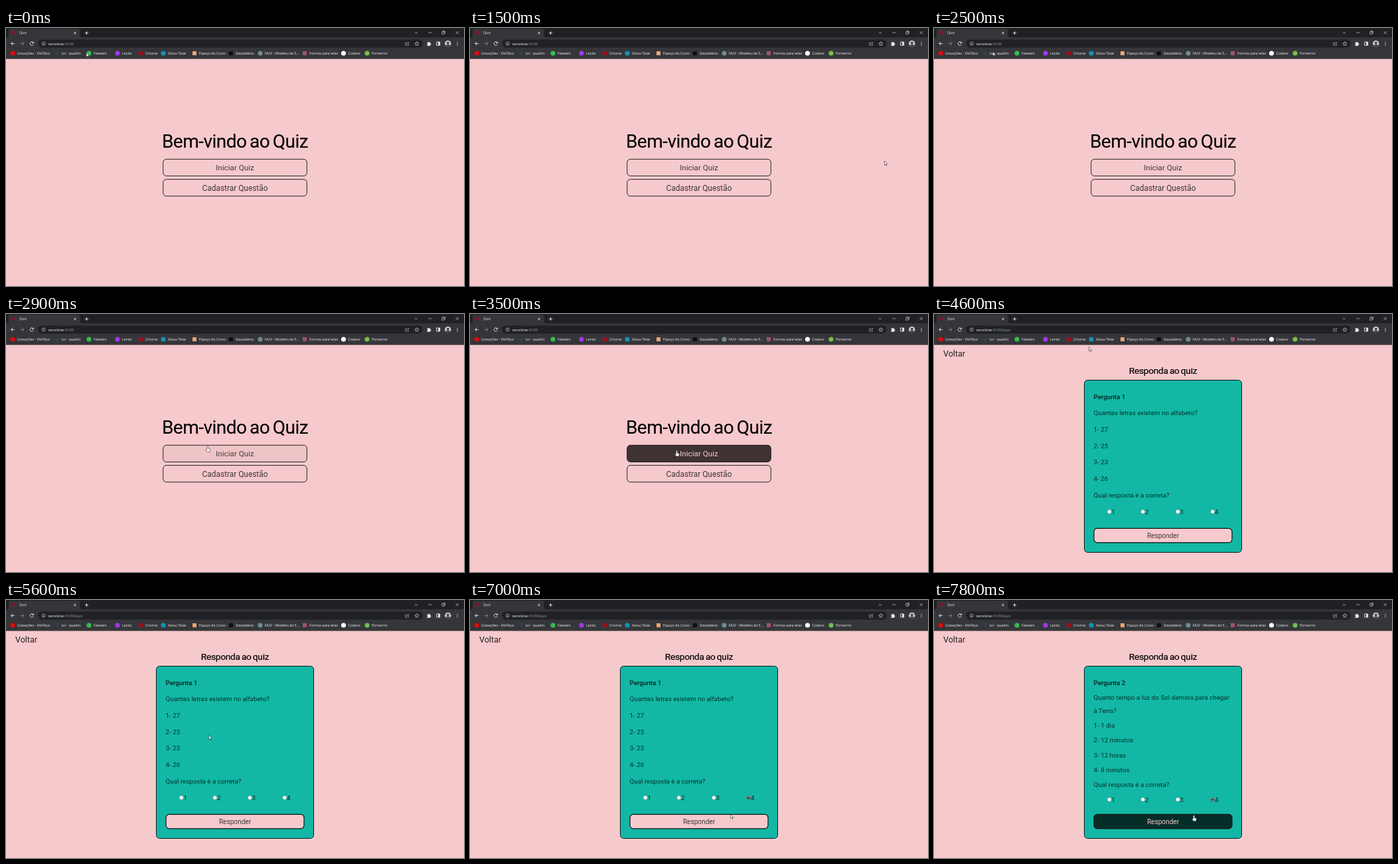
Recreate the animation shown at these times as an HTML page. Size 690x388 px, loop 8 s.

```html
<!DOCTYPE html>
<html lang="pt-BR">
<head>
<meta charset="utf-8">
<title>Quiz</title>
<style>
  html, body { margin: 0; width: 100%; height: 100%; overflow: hidden; background: #f6c9cc; }
  svg { display: block; width: 690px; height: 388px; cursor: default; }
  text { white-space: pre; }
  .ui { font: 500 5.2px "Open Sans", "Noto Sans", sans-serif; fill: #f4f5f6; }
  .url { font-size: 5.9px; }
  .dim { fill: #9aa0a6; }
  .page { font-family: Roboto, Inter, sans-serif; font-weight: 400; fill: #222; }
  .title { fill: #000; stroke: #000; letter-spacing: -.018em; word-spacing: -.07em; }
  .card { font-size: 9.8px; fill: #06302b; }
  .strong { font-weight: 500; fill: #04211e; }
  .line { fill: none; stroke: #e8eaed; stroke-width: .9; }
</style>
</head>
<body>
<svg id="stage" viewBox="0 0 690 388" xmlns="http://www.w3.org/2000/svg"></svg>
<script>
const LOOP = 8000, STEP = 100;
const PINK = [246, 201, 204, 1], SHADE = [0, 0, 0, .75], CLEAR = [0, 0, 0, 0], INK = [62, 56, 57, 1];

const stage = document.getElementById('stage');

function el(parent, tag, attrs, content) {
  const node = document.createElementNS('http://www.w3.org/2000/svg', tag);
  for (const key in attrs) node.setAttribute(key, attrs[key]);
  if (content !== undefined) node.textContent = content;
  return parent.appendChild(node);
}
const group = (parent, cls = '') => el(parent, 'g', { class: cls });
const rect = (p, x, y, width, height, attrs) => el(p, 'rect', { x, y, width, height, ...attrs });
const disc = (p, cx, cy, r, fill, attrs) => el(p, 'circle', { cx, cy, r, fill, ...attrs });
const label = (p, x, y, str, attrs) => el(p, 'text', { x, y, ...attrs }, str);
const path = (p, d, attrs) => el(p, 'path', { d, class: 'line', ...attrs });
const show = (node, on) => node.setAttribute('display', on ? 'inline' : 'none');

// Browser frame
function drawBrowser() {
  const g = group(stage, 'ui');
  rect(g, 0, 0, 690, 15, { fill: '#202124' });
  rect(g, 0, 14, 690, 32.5, { fill: '#35363a' });
  path(g, 'M1 14.2Q4 14.2 4 11V4Q4 1 7 1H108.500Q111.500 1 111.500 4V11Q111.500 14.200 114.500 14.200Z',
    { style: 'fill:#35363a;stroke:none' });
  rect(g, 9.5, 4.5, 5, 5, { fill: '#7d1533' });
  label(g, 20, 9.3, 'Quiz');
  path(g, 'M102.300 5.800l3.400 3.400m0-3.400l-3.400 3.400M121.500 4.800v5.400m-2.700-2.700h5.400');
  path(g, 'M615.800 6l2.200 2.200L620.200 6M636.500 7h5M656.800 5.800h3.400v3.400h-3.400zM658 5.600v-1h3.500v3.400h-1M677.500 4.800l4.400 4.400m0-4.400l-4.400 4.400',
    { style: 'stroke-width:.6' });

  path(g, 'M13 23.500H7.600m2.500-2.600l-2.600 2.600 2.600 2.600');
  path(g, 'M21.500 23.500h5.400m-2.500-2.600l2.600 2.600-2.600 2.600', { style: 'stroke:#85878b' });
  path(g, 'M41 22a2.600 2.600 0 1 0 .3 2.300M41.500 20.500v2h-2');
  rect(g, 48, 17.5, 580, 12, { rx: 6, fill: '#202124' });
  path(g, 'M54.200 23.500a2.500 2.500 0 1 0 5 0a2.500 2.500 0 1 0-5 0M56.700 23v2M56.700 21.700v.6', { style: 'stroke-width:.6' });
  const url = label(g, 63.5, 25.5, '', { class: 'url' });
  el(url, 'tspan', {}, 'servilote');
  const rest = el(url, 'tspan', { class: 'dim' });

  path(g, 'M603.500 22h-1.800v4h5v-1.500M603.500 24.500q.3-2.300 3.200-2.300m-1.300-1.500l1.600 1.500-1.600 1.500', { style: 'stroke-width:.5' });
  path(g, 'M619 20.500l.9 2 2.200.2-1.700 1.500.5 2.200-1.900-1.200-1.900 1.200.5-2.200-1.700-1.500 2.200-.2z', { style: 'stroke-width:.6' });
  path(g, 'M634.500 21.800h1.400a1 1 0 0 1 2 0h1.500v1.500a1 1 0 0 1 0 2v1.400h-4.900v-1.500a1 1 0 0 0 0-1.900z', { style: 'fill:#e8eaed;stroke:none' });
  path(g, 'M648.700 21h5v5h-5z');
  rect(g, 651.2, 21, 2.5, 5, { fill: '#e8eaed' });
  disc(g, 665.8, 23.5, 4.7, '#cfcac6');
  path(g, 'M662.300 26.500q.5-2 3.500-2t3.500 2q-3.500 3.300-7 0z', { style: 'fill:#4b4240;stroke:none' });
  disc(g, 665.8, 22.4, 1.9, '#4b4240');
  for (const y of [21.3, 23.5, 25.7]) disc(g, 680, y, .65, '#e8eaed');

  // icon centre, colour, round, name
  const marks = [
    [10, '#f00', 0, 'Gravações - ViloTeca'], [77, '#29404a', 0, 'lur - quadro'],
    [125, '#2fc24d', 1, 'Falavelo'], [168, '#a435f0', 1, 'Lecda'],
    [203, '#a30d14', 0, 'Cinorva'], [237, '#1a8fb5', 1, 'Sarau Telas'],
    [284, '#eda66c', 0, 'Espaço do Curso'], [339, '#0d0d10', 0, 'Zarpadevia'],
    [383, '#6f8b8e', 1, 'NUV - Modelos de E...'], [450, '#a8506e', 0, 'Formas para telas'],
    [508.5, '#fff', 1, 'Codavo'], [544, '#74c04a', 1, 'Pomarino']
  ];
  for (const [x, fill, round, name] of marks) {
    if (round) disc(g, x, 38, 3.6, fill);
    else rect(g, x - 3, 35, 6, 6, { fill });
    label(g, x + 7, 40, name);
  }
  return rest;
}

function drawButton(p, x, y, w, h, str, size, base, line) {
  const box = rect(p, x, y, w, h, { rx: 5, stroke: '#111', 'stroke-width': line, fill: 'none' });
  const text = label(p, 345, base, str, { 'text-anchor': 'middle', 'font-size': size, fill: mix(INK, PINK, 0) });
  return { box, text };
}

function mix(a, b, k) {
  return `rgba(${a.map((v, i) => +(v + (b[i] - v) * k).toFixed(3)).join()})`;
}

function tint(button, from, k) {
  button.box.setAttribute('fill', mix(from, SHADE, k));
  button.text.setAttribute('fill', mix(INK, PINK, k));
}

function drawHome() {
  const g = group(stage, 'page');
  label(g, 345, 180, 'Bem-vindo ao Quiz', { class: 'title', 'text-anchor': 'middle', 'font-size': 28, 'stroke-width': .1 });
  const start = drawButton(g, 236.7, 197.3, 216.6, 25.2, 'Iniciar Quiz', 11.7, 214, .9);
  drawButton(g, 236.7, 227.6, 216.6, 25.2, 'Cadastrar Questão', 11.9, 244.5, .9);
  return { g, start };
}

function drawQuiz() {
  const g = group(stage, 'page');
  label(g, 14, 64, 'Voltar', { 'font-size': 12.5 });
  label(g, 345, 90.2, 'Responda ao quiz', { class: 'title', 'text-anchor': 'middle', 'font-size': 13.7, 'stroke-width': .2 });
  rect(g, 226.5, 99.5, 237, 259, { rx: 5, fill: '#12b8a5', stroke: '#0c1a19' });
  const send = drawButton(g, 241, 322.4, 208, 21.4, 'Responder', 10.1, 336.8, 1.2);
  return { g, send };
}

function drawQuestion(parent, number, lines, gap, radioY) {
  const g = group(parent, 'card');
  label(g, 240.5, 127.6, 'Pergunta ' + number, { class: 'strong' });
  const wrapped = lines.length > 5;
  [...lines, 'Qual resposta é a correta?'].forEach((str, i) => {
    const y = wrapped ? 149.8 + i * gap - (i ? 1.7 : 0) : 152.3 + i * gap;
    label(g, 240.5, y, str);
  });
  [264.2, 314.8, 367.4, 419.8].forEach((x, i) => {
    disc(g, x, radioY, 3, '#fff', { stroke: '#767676', 'stroke-width': .5 });
    label(g, x + 3.1, radioY + 3.5, i + 1);
  });
  const dot = group(g);
  disc(dot, 419.8, radioY, 2.7, '#fff', { stroke: '#111', 'stroke-width': .8 });
  disc(dot, 419.8, radioY, 1.6, '#111');
  return { g, dot };
}

const rest = drawBrowser();
const home = drawHome();
const quiz = drawQuiz();
const questions = [
  drawQuestion(quiz.g, 1, ['Quais os países que têm a maior e a menor', 'expectativa de vida do mundo?',
    '1- Austrália e Afeganistão', '2- Itália e Chade', '3- Japão e Serra Leoa', '4- Estados Unidos e Angola'], 22.1, 300),
  drawQuestion(quiz.g, 1, ['Quantas letras existem no alfabeto?', '1- 27', '2- 25', '3- 23', '4- 26'], 24.7, 297.3),
  drawQuestion(quiz.g, 2, ['Quanto tempo a luz do Sol demora para chegar', 'à Terra?',
    '1- 1 dia', '2- 12 minutos', '3- 12 horas', '4- 8 minutos'], 22.1, 300)
];

const pointer = group(stage);
const skin = { fill: '#fff', stroke: '#222', 'stroke-width': .55, class: '' };
const arrow = path(pointer, 'M0 0V6.300L1.500 5 2.500 7.300 3.400 6.900 2.500 4.700H4.400Z', skin);
const hand = path(pointer, 'M-1 .8a1 1 0 0 1 2 0V3.400l2 .5q1 .3.9 1.300L3.300 8.600H-.7L-2.700 5.700q-.4-1 .6-1L-1 5.400Z', skin);

// Pointer: time, x, y
const track = [
  [0, 121, 37], [100, 126, 35], [400, 340, 104], [900, 606, 222], [1000, 606, 222],
  [1200, 640, 249], [1350, 653, 225], [1500, 624.5, 200], [1650, 596, 190], [1800, 558, 244],
  [1900, 558, 244], [2350, 76, 26], [2450, 76, 26], [2800, 303.7, 199], [2900, 303.7, 199],
  [3200, 303, 204.5], [3300, 303, 204.5], [3500, 311.5, 205.5], [3800, 311.5, 205.5],
  [4100, 37, 21.5], [4200, 37, 21.5], [4500, 212, 37], [5400, 311, 165], [5600, 305.5, 203.5],
  [6300, 419, 295], [6600, 419, 295], [7000, 392.5, 322], [7200, 391.5, 324], [8000, 391.5, 324]
];

// Smooth slope through a point, flat at turns and rests
function slope(i, axis) {
  const a = track[i - 1], b = track[i], c = track[i + 1];
  if (!a || !c || (b[axis] - a[axis]) * (c[axis] - b[axis]) <= 0) return 0;
  return (c[axis] - a[axis]) / (c[0] - a[0]);
}

function along(t, axis) {
  const i = track.findIndex((p, n) => n && t <= p[0]);
  const a = track[i - 1], b = track[i], span = b[0] - a[0], u = (t - a[0]) / span, v = 1 - u;
  return v * v * (1 + 2 * u) * a[axis] + u * u * (3 - 2 * u) * b[axis]
    + span * u * v * (v * slope(i - 1, axis) - u * slope(i, axis));
}

function ease(t, from, to) {
  const u = Math.min(1, Math.max(0, (t - from) / (to - from)));
  return u * u * (3 - 2 * u);
}

function render(t) {
  const inQuiz = t >= 3700;
  const current = t < 4300 ? 0 : t < 7400 ? 1 : 2;
  show(home.g, !inQuiz);
  show(quiz.g, inQuiz);
  rest.textContent = ':4100' + (inQuiz ? '/quiz' : '');
  questions.forEach(({ g, dot }, i) => {
    show(g, i === current);
    show(dot, t >= 6500);
  });
  tint(home.start, CLEAR, ease(t, 2860, 3200));
  tint(quiz.send, PINK, ease(t, 7000, 7300));

  const pointing = (t >= 2800 && t < 3700) || t >= 7100;
  show(hand, pointing);
  show(arrow, !pointing);
  pointer.setAttribute('transform', `translate(${along(t, 1).toFixed(2)} ${along(t, 2).toFixed(2)})`);
}

function tick() {
  render(Math.floor(performance.now() % LOOP / STEP) * STEP);
  requestAnimationFrame(tick);
}
tick();
</script>
</body>
</html>
```
